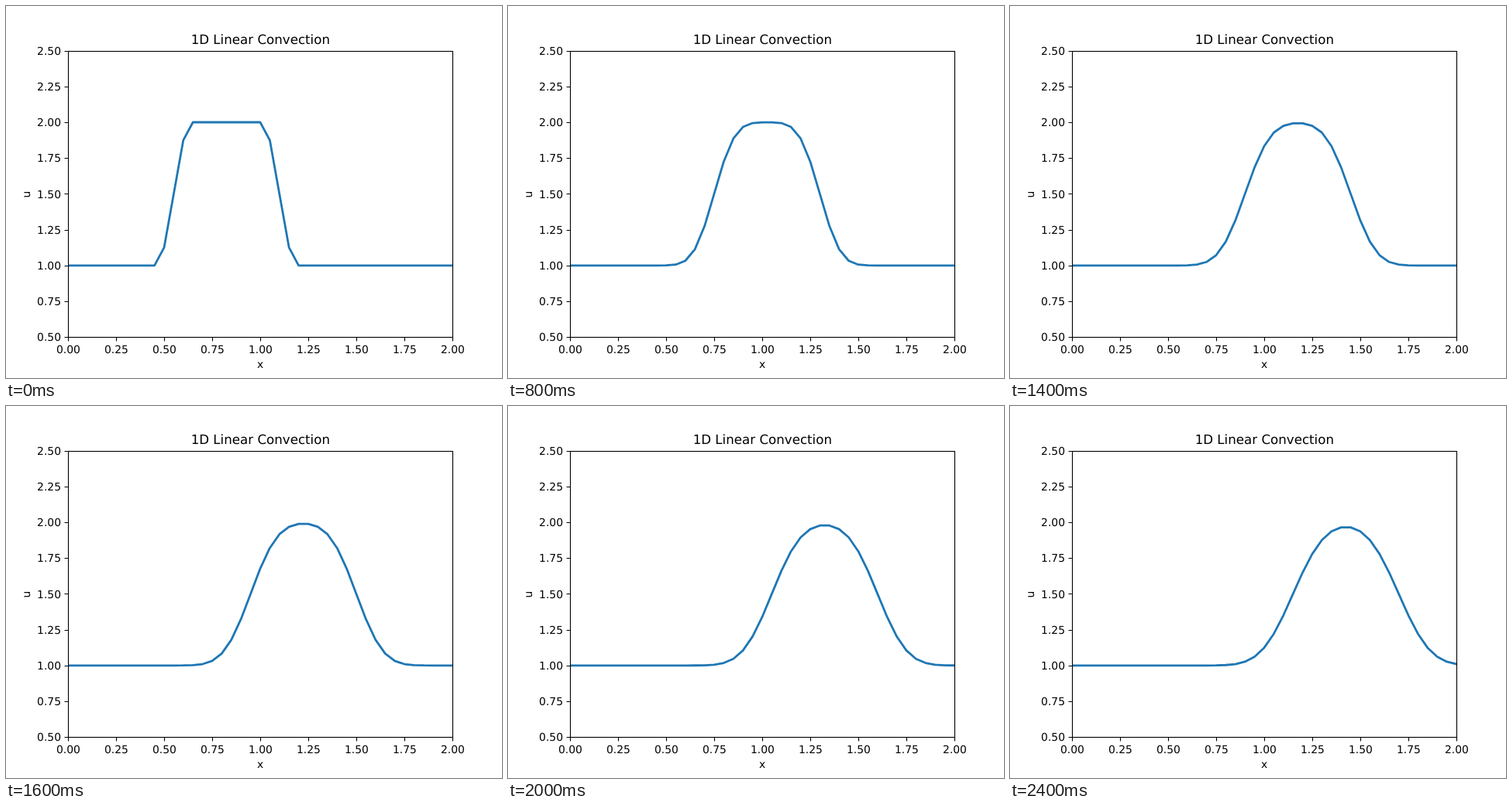
An HTML page for the animation above (2500 ms loop, 640 by 480 pixels).

```html
<!DOCTYPE html>
<html lang="en">
<head>
<meta charset="utf-8">
<title>1D Linear Convection</title>
<style>
  html, body { margin: 0; width: 100%; height: 100%; overflow: hidden; background: #fff; }
  svg { display: block; width: 640px; height: 480px; }
  text { font: 13.889px "DejaVu Sans", sans-serif; fill: #000; text-anchor: middle; text-rendering: geometricPrecision; }
  .title { font-size: 16.667px; }
  .end { text-anchor: end; }
  .axis { fill: none; stroke: #000; stroke-width: 1.111; }
  #wave { fill: none; stroke: #1f77b4; stroke-width: 2.778; stroke-linejoin: round; stroke-linecap: square; }
</style>
</head>
<body>
<svg viewBox="0 0 640 480">
  <clipPath id="plot"><rect x="80" y="58" width="496" height="369"/></clipPath>
  <path id="wave" clip-path="url(#plot)"/>
  <path id="ticks" class="axis"/>
  <rect class="axis" x="80.5" y="58.5" width="496" height="369"/>
  <g id="labels"></g>
  <text class="title" x="328.3" y="49">1D Linear Convection</text>
  <text x="328" y="467">x</text>
  <text transform="translate(31 243) rotate(-90)">u</text>
</svg>
<script>
  const POINTS = 41, DX = 2 / (POINTS - 1), COURANT = 0.5;
  const FIRST_STEP = 3, FRAMES = 25, FRAME_MS = 100;

  const px = x => 80 + 248 * x;
  const py = u => 427.2 - 184.8 * (u - 0.5);

  function addLabel(value, x, y, cls) {
    const label = document.createElementNS("http://www.w3.org/2000/svg", "text");
    label.setAttribute("x", x);
    label.setAttribute("y", y);
    label.setAttribute("class", cls);
    label.textContent = value.toFixed(2);
    document.getElementById("labels").append(label);
  }

  function drawAxes() {
    let d = "";
    for (let i = 0; i <= 8; i++) {
      const x = i / 4, u = 0.5 + i / 4;
      const tickX = Math.round(px(x)), tickY = Math.round(py(u));
      d += `M${tickX + 0.5} 427.5v5M80.5 ${tickY + 0.5}h-5`;
      addLabel(x, px(x) + 0.4, 448, "");
      addLabel(u, 71, Math.round(py(u) + 5.2), "end");
    }
    document.getElementById("ticks").setAttribute("d", d);
  }

  // First-order upwind scheme; the inflow value stays fixed.
  const advance = u => u.map((v, i) => i ? v - COURANT * (v - u[i - 1]) : v);

  const toPath = u => "M" + u.map((v, i) => `${px(i * DX).toFixed(2)} ${py(v).toFixed(3)}`).join("L");

  function solve() {
    let u = Array.from({ length: POINTS }, (_, i) => i >= 10 && i <= 20 ? 2 : 1);
    for (let n = 0; n < FIRST_STEP; n++) u = advance(u);
    const paths = [];
    for (let n = 0; n < FRAMES; n++) {
      paths.push(toPath(u));
      u = advance(u);
    }
    return paths;
  }

  drawAxes();
  const paths = solve();
  const wave = document.getElementById("wave");
  const start = performance.now();

  function render() {
    const frame = Math.floor((performance.now() - start) / FRAME_MS) % FRAMES;
    wave.setAttribute("d", paths[frame]);
    requestAnimationFrame(render);
  }
  render();
</script>
</body>
</html>
```
